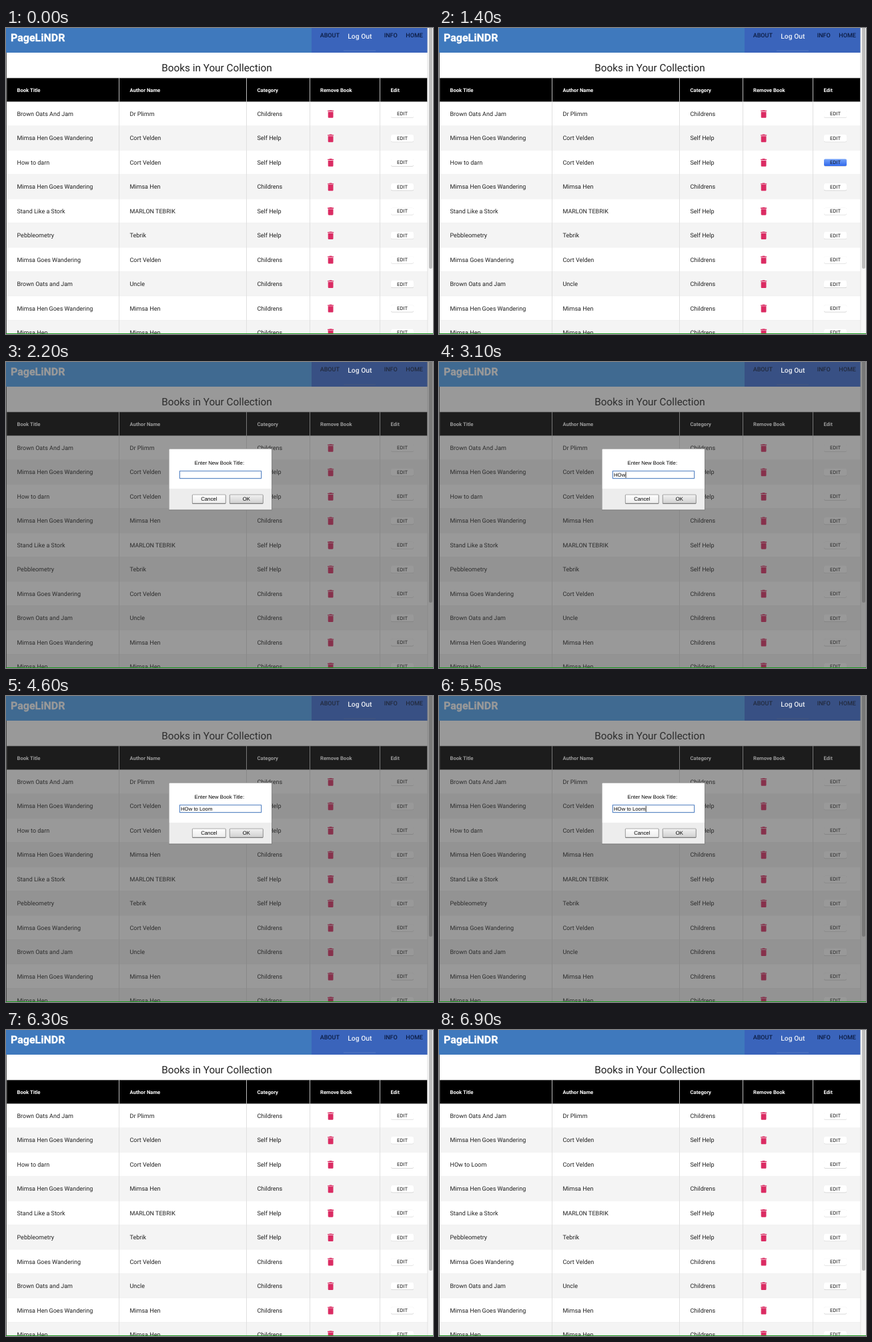
An HTML page that plays this animation: 640x459 px, repeating every 7 s.

```html
<!DOCTYPE html>
<html lang="en">
<head>
<meta charset="utf-8">
<title>Book collection</title>
<style>
  html, body { margin: 0; width: 100%; height: 100%; overflow: hidden; background: #fff; }
  svg { display: block; width: 640px; height: 459px; }
  text { font-family: Roboto, sans-serif; white-space: pre; text-rendering: geometricPrecision; }
  .cell { font-size: 9px; fill: #212121; }
  .head { font-size: 7.7px; font-weight: 700; fill: #fff; }
  .nav { font-size: 9px; font-weight: 500; fill: #0c1c42; }
  .edit { font: 7.2px Inter, sans-serif; fill: #111; text-anchor: middle; }
  .ui { font: 7.75px "Liberation Sans", Arial, sans-serif; fill: #000; }
  .mid { text-anchor: middle; }
</style>
</head>
<body>
<svg id="stage" viewBox="0 0 640 459" xmlns="http://www.w3.org/2000/svg">
  <defs>
    <linearGradient id="blue" x2="0" y2="1">
      <stop stop-color="#75a3f8"/><stop offset="1" stop-color="#3068ec"/>
    </linearGradient>
    <linearGradient id="plain" x2="0" y2="1">
      <stop stop-color="#fff"/><stop offset="1" stop-color="#ececec"/>
    </linearGradient>
    <linearGradient id="default" x2="0" y2="1">
      <stop stop-color="#f2f2f2"/><stop offset="1" stop-color="#d0d0d0"/>
    </linearGradient>
    <path id="bin" transform="scale(.65)" fill="#db2c63"
      d="M6 19c0 1.1.9 2 2 2h8c1.1 0 2-.9 2-2V7H6zM19 4h-3.5l-1-1h-5l-1 1H5v2h14z"/>
  </defs>
  <g id="page"></g>
  <g id="modal"></g>
  <g id="front"></g>
</svg>
<script>
const LOOP = 7000;
const PRESS_EDIT = 1300, OPEN = 1500, PRESS_OK = 6100, CLOSE = 6300, SAVED = 6500;
const OLD_TITLE = "How to darn", NEW_TITLE = "HOw to Loom";
const KEYS = [2500, 2700, 2900, 3300, 3400, 3500, 3600, 3700, 3800, 3900, 4100];
const CARET_OFF = [[2000, 2500], [4600, 5100], [5600, LOOP]];

const COLS = [16.5, 185.5, 376.5, 471, 576.5];
const DIVIDERS = [169.5, 360.5, 455.5, 560.5];
const HEADS = ["Book Title", "Author Name", "Category", "Remove Book", "Edit"];
const KID = "Childrens", HELP = "Self Help";
const BOOKS = [
  ["Brown Oats And Jam", "Dr Plimm", KID],
  ["Mimsa Hen Goes Wandering", "Cort Velden", HELP],
  [OLD_TITLE, "Cort Velden", HELP],
  ["Mimsa Hen Goes Wandering", "Mimsa Hen", KID],
  ["Stand Like a Stork", "MARLON TEBRIK", HELP],
  ["Pebbleometry", "Tebrik", HELP],
  ["Mimsa Goes Wandering", "Cort Velden", KID],
  ["Brown Oats and Jam", "Uncle", KID],
  ["Mimsa Hen Goes Wandering", "Mimsa Hen", KID],
  ["Mimsa Hen", "Mimsa Hen", KID]
];
const EDITED = 2, TOP = 110.7, PITCH = 36.45;

function add(parent, tag, attrs, content) {
  const el = document.createElementNS("http://www.w3.org/2000/svg", tag);
  for (const key in attrs) el.setAttribute(key, attrs[key]);
  if (content) el.textContent = content;
  parent.appendChild(el);
  return el;
}
const rect = (p, x, y, width, height, fill, more) =>
  add(p, "rect", { x, y, width, height, fill, ...more });
const text = (p, x, y, cls, content, more) =>
  add(p, "text", { x, y, class: cls, ...more }, content);

const [page, modal, front] = ["page", "modal", "front"].map(id => document.getElementById(id));

// Page header
rect(page, 0, 0, 640, 459, "#fff");
const bar = rect(page, 0, 0, 632, 37, "#3f79bd");
const menu = rect(page, 458, 0, 174, 37, "#3a64bb");
rect(page, 506, 33.5, 48, 1, "#5378c4");
text(page, 7, 19.7, "", "PageLiNDR",
  { "font-size": 16, "font-weight": 700, fill: "#fff", stroke: "#fff", "stroke-width": .3 });
text(page, 470.7, 14.3, "nav", "ABOUT");
text(page, 566.7, 14.3, "nav", "INFO");
text(page, 599.3, 14.3, "nav", "HOME");
text(page, 316, 64.6, "mid", "Books in Your Collection", { "font-size": 15.3, fill: "#212121" });

// Table
const titles = [], buttons = [];
BOOKS.forEach((book, i) => {
  const y = TOP + i * PITCH, mid = y + 18.1;
  rect(page, 1, y, 631, PITCH, i % 2 ? "#f4f4f4" : "#fff");
  rect(page, 1, y + PITCH - .5, 631, .6, "#e4e4e4");
  book.forEach((s, c) => {
    const el = text(page, COLS[c], mid + 3.1, "cell", s);
    if (!c) titles.push(el);
  });
  add(page, "use", { href: "#bin", x: 478.8, y: mid - 7.6 });
  rect(page, 577, mid - 4.8, 34, 10.8, "#cdcdcd", { rx: 2 });
  buttons.push(rect(page, 577, mid - 5.2, 34, 10.6, "#fff", { rx: 2 }));
  text(page, 594, mid + 2.6, "edit", "EDIT");
});
rect(page, 0, 37, 1, 422, "#555");
rect(page, 1, 75, 630.6, 35.6, "#000", { stroke: "#aaa", "stroke-width": .6 });
HEADS.forEach((s, c) => text(page, COLS[c], 95.8, "head", s));
DIVIDERS.forEach(x => {
  rect(page, x - .5, 75, 1, 35.7, "#bbb");
  rect(page, x - .5, 110.7, 1, 348, "#e0e0e0");
});

// Scroll bar
rect(page, 632, 0, 8, 459, "#f7f7f7");
rect(page, 631.5, 0, .8, 459, "#ddd");
rect(page, 634, -4, 5, 365, "#bdbdbd", { rx: 2.5 });

// Prompt
rect(modal, 0, 0, 640, 459, "#373737", { "fill-opacity": .51 });
rect(modal, 244, 130, 154.5, 92.5, "#777");
rect(modal, 244.5, 130.5, 153.5, 59.5, "#fff");
rect(modal, 244.5, 190, 153.5, 31.5, "#ededed");
text(modal, 319.8, 154.1, "ui mid", "Enter New Book Title:");
rect(modal, 259.5, 162.7, 124, 12.8, "#b4cdef", { rx: 1 });
rect(modal, 260.5, 163.7, 122, 10.8, "#fff", { stroke: "#5580bd", "stroke-width": .9 });
const typed = text(modal, 262, 171.8, "ui", "");
const caret = rect(modal, 262, 164.8, .8, 9, "#000");

function button(x, width, fill, label) {
  rect(modal, x, 199, width, 13.9, "#777", { rx: 1.5 });
  const el = rect(modal, x + .3, 199, width - .6, 13, fill,
    { rx: 1, stroke: "#8c8c8c", "stroke-width": .7 });
  text(modal, x + width / 2, 208.3, "ui mid", label);
  return el;
}
button(279, 50.5, "url(#plain)", "Cancel");
const ok = button(335, 50.5, "url(#default)", "OK");

// Parts that stay bright over the prompt
text(front, 512.3, 16.2, "", "Log Out",
  { "font-size": 10.3, "font-weight": 500, fill: "#fff", "fill-opacity": .9 });
rect(front, 0, 458, 640, 1, "#1a9a1e");

const within = (t, from, to) => t >= from && t < to;

function draw(t) {
  const open = within(t, OPEN, CLOSE);
  modal.style.display = open ? "" : "none";
  bar.setAttribute("fill", open ? "#499fef" : "#3f79bd");
  menu.setAttribute("fill", open ? "#3a6bd6" : "#3a64bb");
  buttons[EDITED].setAttribute("fill", within(t, PRESS_EDIT, OPEN) ? "url(#blue)" : "#fff");
  titles[EDITED].textContent = t >= SAVED ? NEW_TITLE : OLD_TITLE;
  if (!open) return;
  typed.textContent = NEW_TITLE.slice(0, KEYS.filter(k => t >= k).length);
  caret.setAttribute("x", 262.4 + typed.getComputedTextLength());
  caret.style.display = CARET_OFF.some(([a, b]) => within(t, a, b)) ? "none" : "";
  ok.setAttribute("fill", t >= PRESS_OK ? "#939393" : "url(#default)");
}

const start = performance.now();
function tick() {
  draw((performance.now() - start) % LOOP);
  requestAnimationFrame(tick);
}
tick();
</script>
</body>
</html>
```
